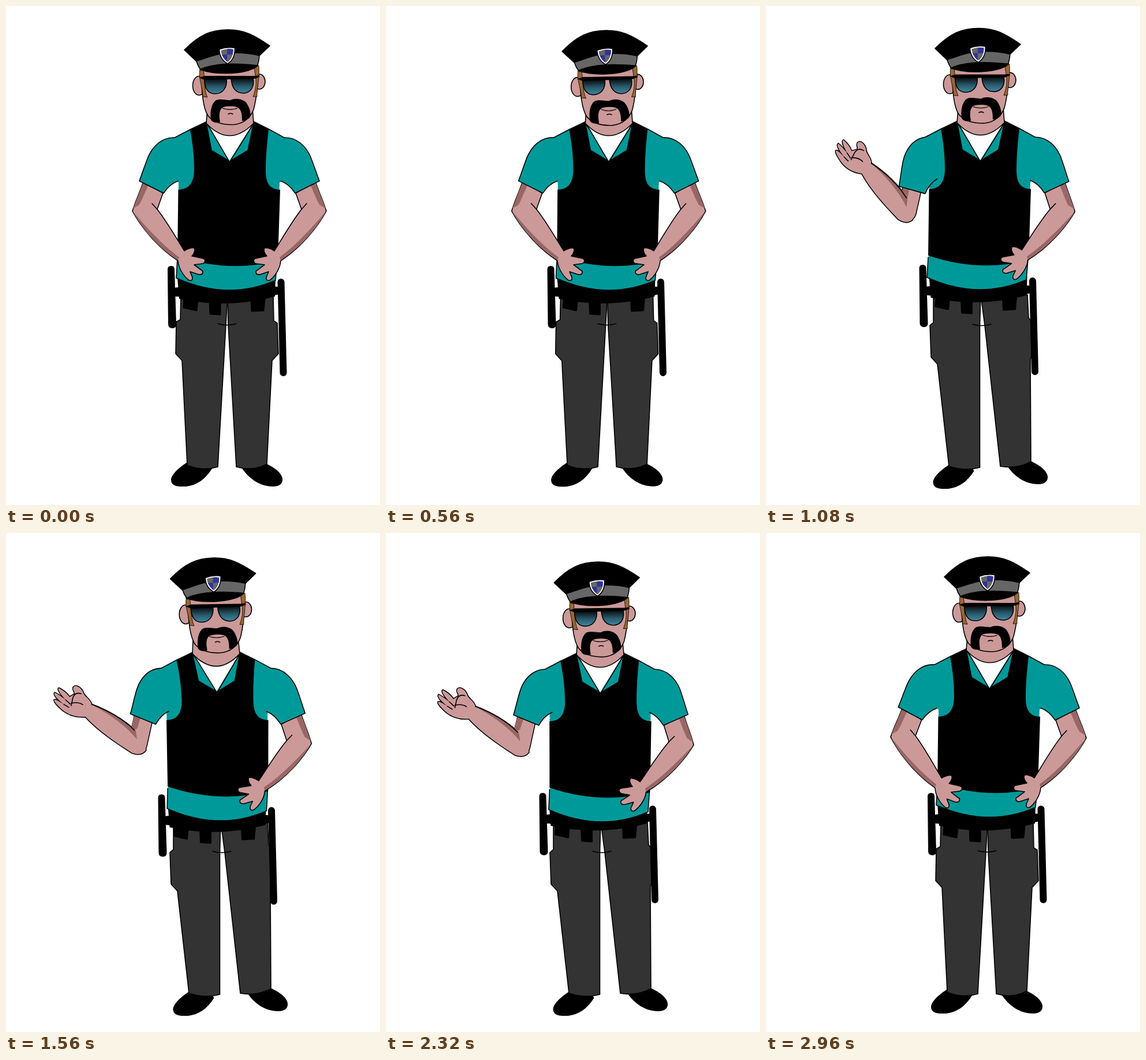
These frames come from a looping animation (648 px wide and 864 px high, 3 s). An HTML page:

```html
<!DOCTYPE html>
<html lang="en">
<head>
<meta charset="utf-8">
<title>Officer</title>
<style>
html, body { margin: 0; width: 100%; height: 100%; overflow: hidden; background: #fff; }
svg { display: block; width: 100vw; height: 100vh; }
.ln { fill: none; stroke: #000; stroke-width: 1.6; stroke-linecap: round; stroke-linejoin: round; }
.skin { fill: #c99; }
.dark { fill: #966; }
.teal { fill: #099; }
.hair { fill: #963; }
.o { stroke: #000; stroke-width: 1.6; stroke-linejoin: round; }
.thin { stroke: #000; stroke-width: .8; }
</style>
</head>
<body>
<svg viewBox="0 0 648 864">
  <defs>
    <linearGradient id="lens" x1="0" y1="0" x2="0" y2="1">
      <stop offset=".08" stop-color="#0a1014"/>
      <stop offset=".55" stop-color="#2a5a6c"/>
      <stop offset="1" stop-color="#3f88a0"/>
    </linearGradient>
    <clipPath id="shield"><path d="M372.500 77Q383 73 393.500 75C394 85 390 93 384 97C377 92 373 85 372.500 77Z"/></clipPath>

    <g id="hipArm">
      <path class="skin o" d="M238 304C232 322 224 338 219 355C232 380 262 418 298 441C299 455 308 468 317 475C323 477 325 472 321 465L319 460L334 465C342 466 343 459 338 457L326 448L341 446C346 444 346 438 341 437L322 433C327 428 328 422 326 419C320 418 314 421 309 424C294 400 278 372 262 352L272 324Z"/>
      <path class="dark" d="M238 305L247 309C240 325 236 335 231 344L220 351C226 335 232 320 238 305ZM220 356C232 380 262 418 298 440L300 435C272 415 245 385 220 356Z"/>
      <path class="ln" d="M253 342L262 352"/>
    </g>
    <g id="sleeve">
      <path class="teal" d="M292 228C270 227 254 243 246 262C240 277 236 290 231 303L273 324C279 315 287 307 298 303L302 250Z"/>
      <path class="ln" d="M292 228C270 227 254 243 246 262C240 277 236 290 231 303L273 324C279 315 287 307 298 303"/>
    </g>
    <path id="fore" d="M244 334C228 310 208 290 181 272C181 262 172 256 172 249C171 240 163 232 158 236C154 240 159 243 157 248L147 251C144 243 138 236 133 232C129 233 133 242 139 254C134 248 128 241 124 238C120 241 126 250 134 261C128 255 123 249 120 250C118 253 124 262 130 271C138 281 150 288 165 290C180 318 205 345 228 369Q242 378 252 370L256 350Z"/>
  </defs>

  <g id="footL"><path d="M314 790C300 799 286 811 286 821C287 833 300 832 312 832C330 830 345 820 357 801L350 790Z"/></g>
  <g id="footR"><path d="M408 799C420 818 440 832 462 832C475 832 480 826 479 818C477 808 465 799 452 793L440 788Z"/></g>
  <path id="legL" class="o" fill="#333"/>
  <path id="legR" class="o" fill="#333"/>
  <path id="crotch" class="ln" d="M367 550Q383 555 399 550"/>

  <g id="belt">
    <path d="M297 470L300 507Q385 525 466 503L467 470Z"/>
    <path stroke="#000" stroke-width="3" stroke-linejoin="round" d="M309 505L308 522L330 527L332 508ZM353 510L354 533L371 534V510ZM425 510L426 528L446 527L448 506ZM288 490L302 488V502L288 501ZM462 487L476 488V497L462 500Z"/>
    <path d="M280 456Q280 450 286 450Q292 450 292 456L295 551Q295 558 288.500 558Q281 558 281 551Z"/>
    <path stroke="#000" stroke-width="12" stroke-linecap="round" d="M476.500 478L480.500 635"/>
  </g>

  <g id="body">
    <path class="teal" d="M348 200L319 213L292 228C284 250 284 290 299 306L298 432L295 471Q384 511 467 475L470 440L474 306C490 290 490 250 482 227L453 212L429 200Z"/>
    <path class="ln" d="M348 200L319 214L292 228M429 200L455 213L482 228M297 436L295 471Q384 511 467 475L470 440"/>
    <path d="M348 200L319 214C324 240 326 262 326 285C325 306 318 317 298.500 318L297 433Q385 463 471 441L475 318C456 317 450 306 450 285C450 262 452 240 455 213L429 200L419 250L390 268H384L356 250Z"/>
    <path fill="#fff" d="M350 205L387 268L427 205Z"/>
    <path class="teal o" d="M347 203L356 250L386 268L354 213ZM429 203L419 250L389 268L423 213Z"/>
    <path class="skin o" d="M349 176L347 203Q387 246 429 203L427 176Z"/>
    <path fill="none" stroke="#077" stroke-width=".7" stroke-dasharray="1 3" d="M304 234C318 255 318 280 299 303M470 234C456 255 456 280 475 303"/>

    <g id="armL">
      <use href="#hipArm" id="hipL"/>
      <g id="raised" stroke-linecap="round">
        <path class="upper" stroke="#000" stroke-width="34"/>
        <use href="#fore" class="fore" stroke="#000" stroke-width="3" stroke-linejoin="round"/>
        <path class="upper" stroke="#c99" stroke-width="31"/>
        <path stroke="#966" stroke-width="11" d="M244 305L236 325"/>
        <g class="fore">
          <use href="#fore" class="skin"/>
          <path class="dark" d="M182 273C208 290 229 312 244 334L242 348C230 322 207 296 182 273Z"/>
          <path class="ln" d="M242 332C228 310 208 290 181 272M139 254L145 263M134 261L141 268M146 266L152 254Q158 244 168 250M147 262Q160 262 166 269"/>
        </g>
      </g>
      <use href="#sleeve"/>
    </g>
    <g id="armR"><g transform="translate(774 0) scale(-1 1)"><use href="#hipArm"/><use href="#sleeve"/></g></g>
  </g>

  <g id="head">
    <ellipse class="skin o" cx="334.500" cy="138" rx="11" ry="16.500"/>
    <ellipse class="skin o" cx="439" cy="131" rx="10" ry="13"/>
    <path class="skin o" d="M339 106C338 150 342 178 350 190C360 202 377 206 394 205.500C412 204 424 193 429 179C434 160 438 130 436 102Z"/>
    <path class="hair thin" d="M336 110C333 124 340 138 341 157L349 158C343 146 345 128 342 110ZM430 105L433 128C434 142 430 152 428 157H435C434 145 440 125 438 103Z"/>
    <path class="o" fill="url(#lens)" d="M344 125L382 125C384 142 375 152 362 152C350 152 343 142 344 125Z"/>
    <path class="o" fill="url(#lens)" d="M390 125L428 124C431 140 424 150 412 151C398 151 391 142 390 125Z"/>
    <path d="M334 124L345 121H430L439 120V123L430 126L344 128Z"/>
    <path d="M355 197C353 182 356 169 364 163C372 160 381 163 389 163C396 159 409 160 416 167C422 175 425 186 423 192C420 196 414 199 409 199C409 188 408 178 400 175C392 173 380 173 375 176C369 180 369 190 371 201C365 203 358 202 355 197Z"/>
    <path id="lips" class="thin"/>
    <path class="ln" d="M385 187Q389 185 393 187"/>
    <path class="o" d="M309 76C335 50 355 41 385 41C412 41 430 50 457 69L438 87L330 96Z"/>
    <path class="o" fill="#666" d="M330 95C350 90 365 81 395 81Q420 81 439 86Q438 98 435 104L338 111Q332 104 330 95Z"/>
    <path class="o" d="M336 110C360 99 400 99 436 103C428 112 405 116 385 116.500C365 117 347 114 336 110Z"/>
    <path class="o" fill="#fff" d="M369.500 75Q383 70 396.500 72.500C397 86 392 95 384 100C375 95 370 86 369.500 75Z"/>
    <g clip-path="url(#shield)">
      <path fill="#666" d="M368 70H400V102H368Z"/>
      <path fill="#339" d="M383 70H400V84H383ZM368 84H383V102H368Z"/>
    </g>
  </g>
</svg>
<script>
const $ = id => document.getElementById(id);
const all = sel => document.querySelectorAll(sel);
const put = (el, value) => el.setAttribute("transform", value);
const move = (id, x, y) => put($(id), `translate(${x} ${y})`);

// Smooth 0 to 1 between two times, and a smooth hump around one.
function ease(t, from, to) {
  const u = Math.min(1, Math.max(0, (t - from) / (to - from)));
  return u * u * (3 - 2 * u);
}
const hump = (t, mid, half) => Math.abs(t - mid) < half ? Math.cos((t - mid) / half * Math.PI / 2) ** 2 : 0;
const wave = (t, beats) => Math.sin(Math.PI * beats * t / 3000) ** 2;

const num = /-?\d+(\.\d+)?/g;
function blend(a, b, k) {
  const to = b.match(num);
  let i = 0;
  return a.replace(num, n => (+n + (to[i++] - n) * k).toFixed(2));
}

const legL = ["M303 500L302 543L295 547L294 602L305 614L314 795Q340 806 367 798L381 553L384 500Z",
              "M290 500L290 548L284 553L286 608L297 620L317 797Q345 806 370.5 799L370.5 553L372 500Z"];
const legR = ["M384 500L385 553L399 798Q428 806 452 793L461 614L472 602L470 549L464 545L463 500Z",
              "M372 500L379 553L406 797Q435 802 459 789L458 612L460 607L459 545L455 540L453 500Z"];

function draw(t) {
  const back = 1 - ease(t, 2720, 2960);
  const lean = ease(t, 540, 720) * back;
  const dip = ease(t, 1080, 1760) * back;
  const sway = hump(t, 1560, 240);
  const early = hump(t, 300, 220);
  const nod = wave(t, 3);
  const raise = ease(t, 660, 1060) - ease(t, 2660, 2920);
  const reach = ease(t, 1080, 1400) * (1 - ease(t, 2320, 2760));

  // Legs and belt
  $("legL").setAttribute("d", blend(...legL, lean));
  $("legR").setAttribute("d", blend(...legR, lean));
  move("crotch", -9 * lean, lean);
  move("footL", 3.5 * lean, 4 * lean);
  move("footR", 9 * lean, -4 * lean);
  move("belt", -14.5 * lean - 2 * sway, 2 * (dip - lean) + 3 * sway);

  // Torso shears between the neck and the hem
  const neck = 5 * early - 16 * lean - 6 * sway - nod * (1 - lean);
  const hem = 3 * early - 16 * lean + 3 * dip - 2 * sway;
  const drop = 9 * dip - lean - early;
  const shear = (hem - neck) / 207;
  put($("body"), `matrix(1 0 ${shear} 1 ${neck - shear * 268} ${drop})`);

  const lift = 1.5 * nod - 5.5 * sway - 6 * hump(t, 860, 340) - 3 * early;
  put($("head"), `translate(${neck} ${drop + lift}) rotate(${-nod} 388 215)`);
  const open = 5 * Math.max(0, wave(t, 14) - .6) / 2;
  $("lips").setAttribute("d", `M375 ${177 + open}Q388 ${182 + 3 * open} 401 ${177 + open}Q388 ${181 + open} 375 ${177 + open}Z`);
  $("lips").setAttribute("fill", open > .2 ? "#fff" : "#c99");

  // Arms
  const turn = 4 * (hump(t, 660, 110) + hump(t, 2900, 100)) - 11 * raise + 7 * reach;
  put($("armL"), `rotate(${turn} 292 228)`);
  put($("armR"), `rotate(${1.7 * lean + 1.5 * dip} 482 228)`);
  const up = raise > .1;
  $("raised").style.display = up ? "" : "none";
  $("hipL").style.display = up ? "none" : "";
  const ex = 237 + 3 * dip, ey = 345 + 8 * dip;
  const bend = 165 * (1 - raise) - 13 * reach - turn;
  all(".upper").forEach(el => el.setAttribute("d", `M254 308L${ex - 1} ${ey + 4}`));
  all(".fore").forEach(el => put(el, `translate(${ex - 243} ${ey - 352}) rotate(${bend} 243 352)`));
}

const start = performance.now();
function tick() {
  const t = (performance.now() - start) % 3000;
  draw(t < 120 ? 0 : Math.floor(t / 40) * 40);
  requestAnimationFrame(tick);
}
tick();
</script>
</body>
</html>
```
